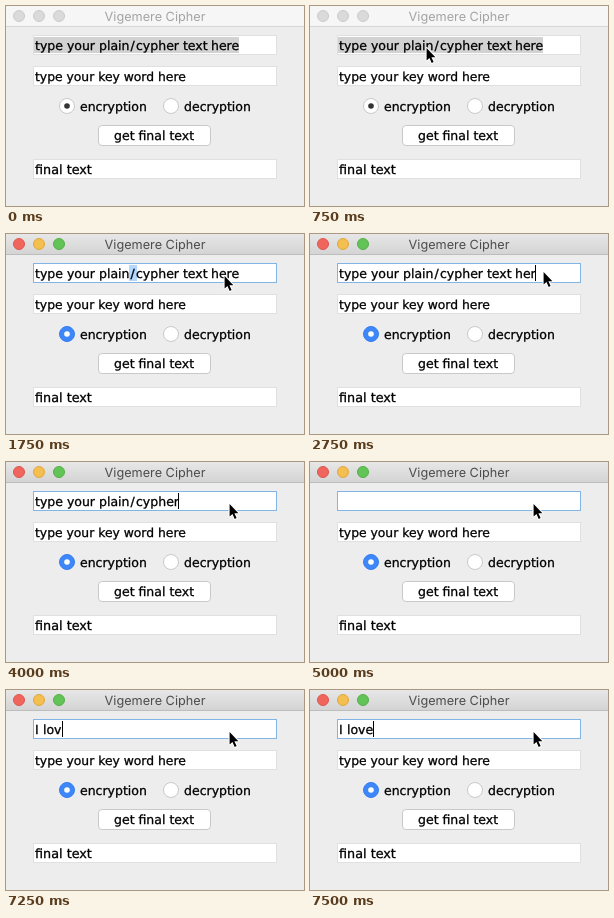
Recreate the animation shown at these times as an HTML page. Size 298 px wide and 200 px high, loop 8000 ms.

```html
<!DOCTYPE html>
<html lang="en">
<head>
<meta charset="utf-8">
<title>Vigemere Cipher</title>
<style>
  html, body { margin: 0; width: 100%; height: 100%; overflow: hidden; background: #ededed; }
  svg { display: block; width: 298px; height: 200px; }
  text {
    font: 12.5px "DejaVu Sans", sans-serif; text-rendering: geometricPrecision; white-space: pre;
    stroke: #000; stroke-width: .3px;
  }
  .title { font: 12.7px Inter, sans-serif; text-anchor: middle; fill: #a4a4a4; stroke: none; }
  .bar { fill: #f6f6f6; }
  .line { fill: #d6d6d6; }
  .light { fill: #dadada; stroke: #cbcbcb; }
  .field { fill: #fff; stroke: #e0e0e0; }
  .button, .radio { fill: #fff; stroke: #c9c9c9; }
  .dot { fill: #333; }
  .active .title { fill: #4c4c4c; }
  .active .bar { fill: url(#shade); }
  .active .line { fill: #bdbdbd; }
  .active .light { fill: var(--on); stroke: var(--rim); }
  .active .focus { stroke: #83b4e6; }
  .active .on { fill: #3d87f8; stroke: #357df0; }
  .active .dot { fill: #fff; }
</style>
</head>
<body>
<svg id="stage" viewBox="0 0 298 200">
  <linearGradient id="shade" x2="0" y2="1">
    <stop stop-color="#e7e7e7"/><stop offset="1" stop-color="#d4d4d4"/>
  </linearGradient>
  <rect width="298" height="200" fill="#ededed"/>
  <rect class="bar" width="298" height="20"/>
  <rect class="line" y="20" width="298" height="1"/>
  <circle class="light" cx="13" cy="10" r="5.5" style="--on:#f0655c;--rim:#dc5850"/>
  <circle class="light" cx="33" cy="10" r="5.5" style="--on:#f5be50;--rim:#dfa843"/>
  <circle class="light" cx="53" cy="10" r="5.5" style="--on:#62c456;--rim:#54ae49"/>
  <text class="title" x="149" y="14.5">Vigemere Cipher</text>

  <rect class="field focus" x="27.5" y="29.5" width="243" height="19"/>
  <rect id="mark" y="31" height="16"/>
  <text id="entry" y="44"></text>
  <rect id="caret" y="31" width="1" height="16"/>

  <rect class="field" x="27.5" y="60.5" width="243" height="19"/>
  <text x="29" y="75" style="font-size:12.35px">type your key word here</text>

  <circle class="radio on" cx="61" cy="100" r="7.5"/>
  <circle class="dot" cx="61" cy="100" r="2.8"/>
  <text x="74" y="105">encryption</text>
  <circle class="radio" cx="165" cy="100" r="7.5"/>
  <text x="178" y="105">decryption</text>

  <rect class="button" x="92.5" y="119.5" width="112" height="20" rx="3.5"/>
  <text x="108" y="134">get final text</text>

  <rect class="field" x="27.5" y="153.5" width="243" height="19"/>
  <text x="29" y="168" style="font-size:12.8px">final text</text>

  <path id="pointer" d="M.6 1V13.6L3.5 10.9 5.7 15.9 7.6 15 5.4 10.2H9.4Z"
    stroke="#fff" stroke-width="2" stroke-linejoin="round" paint-order="stroke"/>
</svg>
<script>
const LOOP = 8000;
const $ = id => document.getElementById(id);

// Each phrase is a row of [x, text] pieces.
const HINT = [[29, "type your plain"], [124.5, "/"], [130, "cypher text "], [205, "here"]];
const REPLY = [[29, "I "], [37, "love"]];

// time, phrase, visible characters, caret x (0 = hidden)
const EDITS = [
  [0, HINT, 32, 0], [1000, HINT, 32, 123], [1250, HINT, 32, 0],
  [2000, HINT, 32, 232], [2750, HINT, 31, 225], [3250, HINT, 28, 205],
  [3500, HINT, 25, 188], [3750, HINT, 22, 172], [4500, HINT, 0, 29],
  [5000, HINT, 0, 0], [5500, HINT, 0, 29], [6000, REPLY, 1, 33],
  [6250, REPLY, 2, 37], [6500, REPLY, 3, 41], [6750, REPLY, 4, 49],
  [7250, REPLY, 5, 56], [7500, REPLY, 6, 63]
];
// time, pointer x, pointer y
const MOVES = [
  [0, -50, 0], [250, 227, 70], [500, 116, 58], [750, 116, 41],
  [1750, 218, 41], [2000, 233, 37], [4000, 223, 41]
];
// time, selection start, selection end, colour
const MARKS = [[0, 28, 233, "#d2d2d2"], [1000, 0, 0, "none"], [1250, 123, 131, "#b3d7ff"], [2000, 0, 0, "none"]];

const stepAt = (steps, t) => steps.findLast(step => step[0] <= t);

function set(id, attrs) {
  for (const key in attrs) $(id).setAttribute(key, attrs[key]);
}

function spans(pieces, count) {
  return pieces.map(([x, text]) => {
    const part = text.slice(0, Math.max(0, count));
    count -= text.length;
    return part && `<tspan x="${x}">${part}</tspan>`;
  }).join("");
}

let shown;
function draw(t) {
  const [, phrase, count, caret] = stepAt(EDITS, t);
  const [, x, y] = stepAt(MOVES, t);
  const [, from, to, fill] = stepAt(MARKS, t);
  const text = spans(phrase, count);
  if (text !== shown) $("entry").innerHTML = shown = text;
  set("stage", { class: t < 1000 ? "" : "active" });
  set("caret", { x: caret, opacity: caret ? 1 : 0 });
  set("mark", { x: from, width: to - from, fill });
  set("pointer", { transform: `translate(${x} ${y})` });
}

const start = performance.now();
function tick() {
  draw((performance.now() - start) % LOOP);
  requestAnimationFrame(tick);
}
tick();
</script>
</body>
</html>
```
